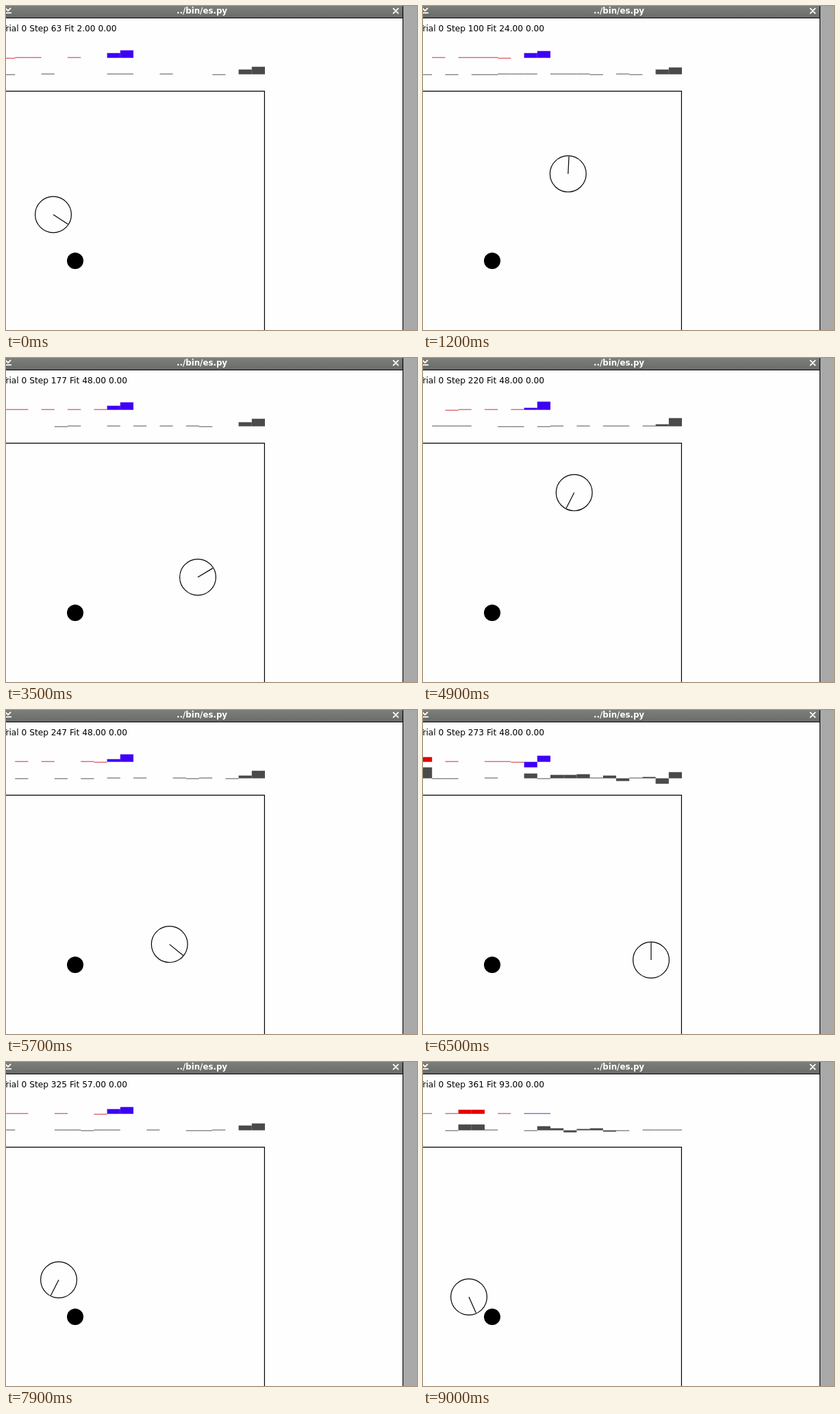
Animation, 600 px wide and 473 px high, one loop 9100 ms. Source, as an HTML page:

```html
<!DOCTYPE html>
<html lang="en">
<head>
<meta charset="utf-8">
<title>Robot trial</title>
<style>
  html, body { margin: 0; width: 100%; height: 100%; overflow: hidden; background: #fefefe; }
  svg { display: block; width: 600px; height: 473px; }
  text { font-family: "DejaVu Sans", sans-serif; white-space: pre; }
  .title { font-size: 11.8px; font-weight: bold; fill: #fff; text-anchor: middle; }
  .status { font-size: 12.2px; }
  .icon { fill: none; stroke: #fff; stroke-width: 1.8; }
  .line { fill: none; stroke: #000; stroke-width: 1.2; }
</style>
</head>
<body>
<svg viewBox="0 0 600 473">
  <defs>
    <linearGradient id="bar" x1="0" y1="0" x2="0" y2="1">
      <stop offset="0" stop-color="#7c7e7a"/>
      <stop offset="1" stop-color="#6a6c68"/>
    </linearGradient>
  </defs>
  <rect width="579" height="17" fill="url(#bar)"/>
  <path class="line" d="M0 17.5H579M579.5 0V473"/>
  <rect x="580" width="20" height="473" fill="#a9a9a9"/>
  <path class="icon" d="M-1 3l4 4 4-4M-1 10.2h9M565 3.2l8 8m0-8l-8 8"/>
  <text class="title" x="286" y="11">../bin/es.py</text>
  <text class="status" id="status" x="-6.2" y="37.4"></text>
  <g id="bars"></g>
  <path class="line" d="M0 124.4H377.4V473"/>
  <circle cx="101" cy="372" r="12"/>
  <g id="robot" class="line">
    <circle r="26.4"/>
    <line id="nose"/>
  </g>
</svg>
<script>
const TICK = 100, TICKS = 91;
const WALL = 65, BALL = 83; // ticks at which the robot meets them
const $ = id => document.getElementById(id);
const mix = (a, b, u) => a + (b - a) * u;
const rad = deg => deg * Math.PI / 180;

// Ends of left-hand arcs: tick, x, y, heading in degrees
const arcs = [
  [0, 69, 304.5, 33], [10, 200, 277, -58], [17, 178, 180, -160],
  [23, 135.7, 254.5, -244], [30, 188, 346, -360], [35, 280, 320, -391],
  [42, 308, 190, -490], [49, 220.7, 196.6, -603], [60, 290, 368, -710],
  [WALL, 333, 365, -810], [72, 234, 266, -882], [79, 77, 318, -963],
  [BALL, 66, 341, -985], [90, 67, 343, -1014]
];
const steps = [[0, 63], [23, 133], [35, 177], [49, 220], [WALL, 273], [79, 325], [90, 361]];
const fits = [[0, 2], [7, 24], [23, 24], [30, 48], [76.5, 48], [79, 57], [90, 93]];
const leftWheel = [[0, 7], [35, 6], [49, 3], [61, 4], [WALL, -8], [69, 7], [79, 7], [BALL, 1], [90, 1]];
const rightWheel = [[0, 11], [23, 10], [49, 12], [WALL, 9], [79, 10], [BALL, 1], [90, 1]];

// Neighbouring keys and the share of the way between them
function span(keys, t) {
  let i = 0;
  while (i < keys.length - 2 && keys[i + 1][0] <= t) i++;
  const a = keys[i], b = keys[i + 1];
  return [a, b, (t - a[0]) / (b[0] - a[0])];
}

function track(keys, t) {
  const [a, b, u] = span(keys, t);
  return Math.round(mix(a[1], b[1], u));
}

function random(seed) {
  const s = Math.sin(seed * 12.9898 + 4.1) * 43758.5453;
  return s - Math.floor(s);
}

// Hermite curve whose tangent length makes it follow a circular arc
function robotAt(t) {
  const [[, ax, ay, from], [, bx, by, to], u] = span(arcs, t);
  const pull = Math.hypot(bx - ax, by - ay) / Math.cos(rad(to - from) / 4) ** 2;
  const curve = (p, q, dir) =>
    p * (1 + 2 * u) * (1 - u) ** 2 + q * u * u * (3 - 2 * u) +
    pull * u * (1 - u) * (dir(rad(from)) * (1 - u) - dir(rad(to)) * u);
  return {
    x: curve(ax, bx, Math.cos),
    y: curve(ay, by, Math.sin),
    turn: rad(mix(from, to, u))
  };
}

const nearWall = t => Math.max(0, 1 - Math.abs(t - WALL) / 4);
const nearBall = t => Math.min(1, Math.max(0, (t - BALL + 4) / 4));

// Idle cells flicker around zero
function flicker(seed) {
  const r = random(seed);
  return r < 0.5 ? 0 : r < 0.78 ? 1 : -1;
}

function sensor(i, t, wallPeak, ballPeak) {
  if (i === 0 && nearWall(t)) return wallPeak * nearWall(t);
  if ((i === 3 || i === 4) && nearBall(t)) return ballPeak * nearBall(t);
  return flicker(t * 31 + i + wallPeak);
}

function neuron(i, t) {
  if (i < 8) return sensor(i, t, 16, 8.5);
  if (i === 18) return track(leftWheel, t);
  if (i === 19) return track(rightWheel, t);
  const excited = Math.max(nearWall(t), nearBall(t) * 0.7);
  return flicker(t * 31 + i) + Math.round(excited * 12 * (random(t * 7 + i) - 0.4));
}

const rows = [
  { from: 0, to: 8, base: 75.7, fill: "#e20006", thin: "#cc3038", value: (i, t) => sensor(i, t, 7, 6) },
  { from: 8, to: 10, base: 75.7, fill: "#3f00f4", thin: "#4a35c8",
    value: (i, t) => track(i === 8 ? leftWheel : rightWheel, t) },
  { from: 0, to: 20, base: 99.7, fill: "#4a4a4a", thin: "#555", value: neuron }
];
const edge = i => -6 + 19.2 * i;

for (const row of rows) {
  row.bars = [];
  for (let i = row.from; i < row.to; i++) {
    const bar = document.createElementNS("http://www.w3.org/2000/svg", "rect");
    bar.setAttribute("x", edge(i));
    bar.setAttribute("width", 19.2);
    row.bars.push($("bars").appendChild(bar));
  }
}

function drawRow(row, t) {
  row.bars.forEach((bar, n) => {
    const v = row.value(row.from + n, t), size = Math.abs(v);
    bar.setAttribute("y", row.base - Math.max(v, 0));
    bar.setAttribute("height", size);
    bar.setAttribute("fill", size < 2 ? row.thin : row.fill);
  });
}

function draw(t) {
  $("status").textContent =
    `Trial 0 Step ${track(steps, t)} Fit ${track(fits, t).toFixed(2)} 0.00`;
  rows.forEach(row => drawRow(row, t));
  const { x, y, turn } = robotAt(t);
  $("robot").setAttribute("transform", `translate(${x.toFixed(1)} ${y.toFixed(1)})`);
  $("nose").setAttribute("x2", 25.5 * Math.cos(turn));
  $("nose").setAttribute("y2", 25.5 * Math.sin(turn));
}

const begin = performance.now();
let last = -1;
function loop() {
  const t = Math.floor((performance.now() - begin) / TICK) % TICKS;
  if (t !== last) draw(last = t);
  requestAnimationFrame(loop);
}
loop();
</script>
</body>
</html>
```
